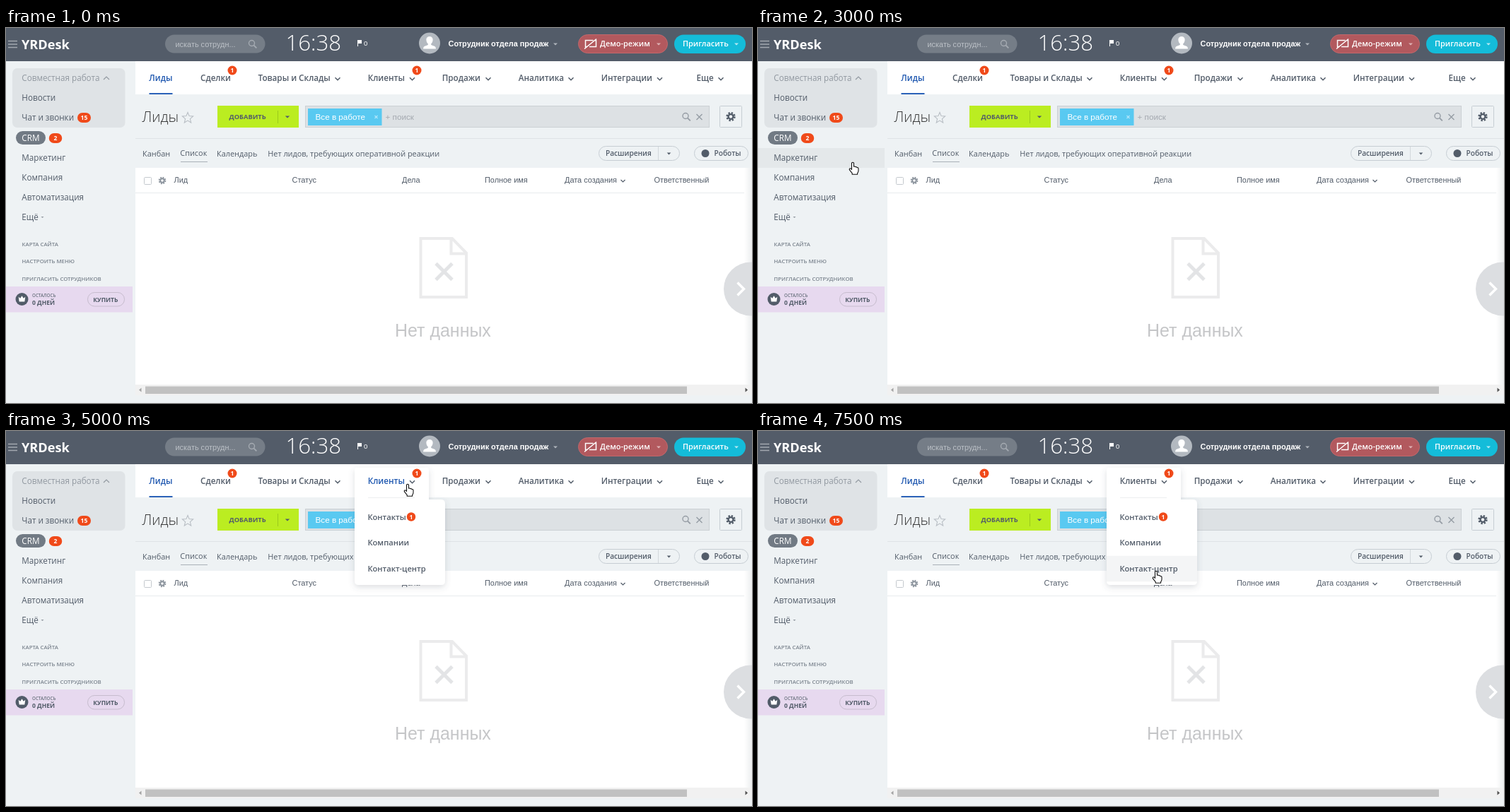
An HTML page for the animation above (8 s loop, 1055x531 px).

```html
<!DOCTYPE html>
<html lang="ru">
<head>
<meta charset="utf-8">
<title>CRM</title>
<style>
html, body { margin: 0; width: 100%; height: 100%; overflow: hidden; background: #eef2f4; }
svg { display: block; width: 100%; height: 100%; }
text { white-space: pre; }
.o { font-family: "Open Sans", sans-serif; }
.a { font-family: "Liberation Sans", Arial, sans-serif; }
</style>
</head>
<body>
<svg id="stage" viewBox="0 0 1055 531"></svg>
<script>
const INK = '#525c69', RED = '#f04a1a', GREY = '#a4a9b0';

const rect = (x, y, w, h, fill, r = 0, extra = '') =>
  `<rect x="${x}" y="${y}" width="${w}" height="${h}" rx="${r}" fill="${fill}" ${extra}/>`;
const circle = (x, y, r, fill, extra = '') =>
  `<circle cx="${x}" cy="${y}" r="${r}" fill="${fill}" ${extra}/>`;
const line = (d, stroke, w = 1, extra = '') =>
  `<path d="${d}" fill="none" stroke="${stroke}" stroke-width="${w}" ${extra}/>`;
const shape = (d, fill, extra = '') => `<path d="${d}" fill="${fill}" ${extra}/>`;
const label = (cls, x, y, str, size, fill = INK, weight = 400, extra = '') =>
  `<text class="${cls}" x="${x}" y="${y}" font-size="${size}" fill="${fill}" font-weight="${weight}" ${extra}>${str}</text>`;
const open = (...args) => label('o', ...args);
const arial = (...args) => label('a', ...args);
const chevron = (x, y, color = INK, r = 3.5, w = 1.5) =>
  line(`M${x - r} ${y - r / 2}l${r} ${r} ${r} ${-r}`, color, w);
const caret = (x, y, color, r = 3) => shape(`M${x - r} ${y - r / 2}h${2 * r}l${-r} ${r}z`, color);
const badge = (x, y, w, h, str, size) => rect(x - w / 2, y - h / 2, w, h, RED, h / 2) +
  open(x, y + size * .36, str, size, '#fff', 700, 'text-anchor="middle"');
const cross = (x, y, r, color, w) =>
  line(`M${x - r} ${y - r}l${2 * r} ${2 * r}m0 ${-2 * r}l${-2 * r} ${2 * r}`, color, w);
const lens = (x, y, r, color) => circle(x, y, r, 'none', `stroke="${color}" stroke-width="1.4"`) +
  line(`M${x + r * .7} ${y + r * .7}l4 4`, color, 1.8);
const gear = (x, y, r, fill, hole) => circle(x, y, r * .7, fill) +
  circle(x, y, r * .82, 'none', `stroke="${fill}" stroke-width="${r * .4}" stroke-dasharray="${r * .36} ${r * .284}"`) +
  circle(x, y, r * .34, hole);

function star(cx, cy, R) {
  const pts = Array.from({ length: 10 }, (_, i) => {
    const a = Math.PI * (i / 5 - .5), r = i % 2 ? R * .45 : R;
    return `${cx + r * Math.cos(a)} ${cy + r * Math.sin(a)}`;
  });
  return line(`M${pts.join('L')}z`, '#b8bec4', 1.1);
}

const header = () => rect(0, 0, 1055, 47, '#535c69') +
  line('M3 18.5h13M3 23h13M3 27.5h13', '#a2a8b0', 1.3) +
  open(22, 29.5, 'YRDesk', 18.2, '#fff', 700) +
  rect(225, 9.5, 141.5, 26, '#757d87', 13) +
  arial(239.5, 26.5, 'искать сотрудн...', 10.92, '#bcc1c7') +
  lens(347.5, 21.5, 4, '#a5abb2') +
  open(395.5, 32, '16:38', 31.2, '#fff', 300) +
  line('M497.5 17v9', '#fff') + rect(498, 17, 5, 5, '#fff') +
  arial(506, 24.5, '0', 9.6, '#fff') +
  circle(599, 21.5, 15, '#b3b9c0') +
  shape('M599 12c3 0 4.8 2.2 4.6 5.2-.2 2.6-1.4 4.3-2.4 5.1v1.6l5.3 2.2q1.3.7 1.5 3.4h-18q.2-2.7 1.5-3.4l5.3-2.2v-1.6c-1-.8-2.2-2.5-2.4-5.1-.2-3 1.6-5.2 4.6-5.2z', '#fff') +
  arial(625.5, 26, 'Сотрудник отдела продаж', 10.92, '#fff', 700) +
  caret(777, 23, '#b0b6bd') +
  rect(809.5, 9.5, 126, 26, '#b2595e', 13, 'stroke="#c4686c"') +
  line('M822 26.5h-2.5v-9h11M832.5 17.5h2v9h-9.5M818 29.5l17-14', '#fff', 1.5) +
  open(840, 26.3, 'Демо-режим', 10.92, '#fff', 600) + caret(923, 23, '#dfb3b5') +
  rect(945, 9.5, 101, 26.5, '#14bcd9', 13.2) +
  open(957, 26.3, 'Пригласить', 10.92, '#fff', 600) + caret(1033, 23, '#b5eaf3');

const sidebarBack = () => rect(9, 57, 159.5, 84, '#dfe3e6', 7) + rect(0, 366, 179, 36.5, '#e7d9ef');

const sidebar = () => {
  const items = ['Новости', 'Чат и звонки', '', 'Маркетинг', 'Компания', 'Автоматизация', 'Ещё'];
  const links = ['КАРТА САЙТА', 'НАСТРОИТЬ МЕНЮ', 'ПРИГЛАСИТЬ СОТРУДНИКОВ'];
  return open(22.3, 75, 'Совместная работа', 11.7, '#9299a1') +
    line('M138 73l4-4 4 4', '#9299a1', 1.2) +
    items.map((s, i) => open(22.3, 103.2 + i * 28.1, s, 11.7)).join('') +
    badge(110.5, 127, 19, 14, '15', 8.6) +
    rect(14, 146, 42, 19, '#717a84', 9.5) +
    open(22.3, 160, 'CRM', 11.7, '#fff', 500) +
    badge(70, 156, 18.5, 14, '2', 8.6) + caret(51.5, 268, '#9299a1', 2) +
    links.map((s, i) => open(22.5, 309.3 + i * 24.1, s, 7.8, '#7c858f', 600)).join('') +
    circle(22.5, 384, 9, INK) +
    shape('M17.7 380.7l2.5 2 2.3-3.4 2.3 3.4 2.5-2-1 6.8h-7.6z', '#fff') +
    open(37, 380.5, 'ОСТАЛОСЬ', 6.24, '#6c7480', 600) +
    open(37, 392, '0 ДНЕЙ', 8.58, INK, 700) +
    rect(115.5, 374.5, 52, 19.5, 'none', 9.7, 'stroke="#c6bccd"') +
    open(123.3, 387.5, 'КУПИТЬ', 8.58, INK, 700);
};

const tabs = () => rect(183, 47, 872, 47, '#fff') +
  open(202.3, 75, 'Лиды', 11.7, '#1f58b0', 600) + rect(202.5, 92, 33, 2, '#2b62b8') +
  [[275, 'Сделки'], [356.6, 'Товары и Склады', 469], [616.7, 'Продажи', 682], [724.7, 'Аналитика', 799],
   [841.7, 'Интеграции', 924.5], [976.4, 'Еще', 1011]]
    .map(([x, s, c]) => open(x, 75, s, 11.7, INK, 600) + (c ? chevron(c, 72) : '')).join('') +
  badge(320, 60, 13, 13, '1', 8.6);

const toolbar = () => open(192.5, 133, 'Лиды', 20.3, '#333', 300) + star(257, 127.5, 8) +
  rect(299, 110, 115, 31, '#bbed21') + open(315.5, 129.3, 'ДОБАВИТЬ', 9.36, INK, 700) +
  line('M384.5 117v18', '#9cc91c') + caret(398, 126, INK, 3.2) +
  rect(423.5, 110.5, 571, 30, '#dde1e4', 0, 'stroke="#cbd0d4"') +
  rect(427, 114, 104.5, 24, '#59c9f1') + arial(437.5, 129.7, 'Все в работе', 11.7, '#fff') +
  cross(523.5, 126, 2, '#b4e7fa', 1.1) + arial(536.5, 129.7, '+ поиск', 11.7, GREY) +
  lens(961, 124.5, 4, '#959ca4') + cross(980.5, 126, 4, '#959ca4', 1.4) +
  rect(1009.5, 110.5, 31, 30, '#eef2f4', 1, 'stroke="#c6cdd3"') + gear(1025, 125.5, 6.5, INK, '#eef2f4') +
  line('M183 156.5H1055', '#dfe3e6') +
  [[193, 'Канбан'], [246.3, 'Список'], [370.3, 'Нет лидов, требующих оперативной реакции']]
    .map(([x, s]) => open(x, s === 'Список' ? 181.3 : 182, s, 10.92)).join('') +
  open(298, 182, 'Календарь', 10.92) +
  line('M247 189.5H285', '#a9b0b7') +
  rect(838.5, 167.5, 114, 20, 'none', 10, 'stroke="#c6cdd3"') +
  open(848, 181, 'Расширения', 10.14, INK, 600) + line('M922.5 168v19', '#d3d8dc') + caret(937.5, 178, INK, 2.8) +
  rect(973.5, 167.5, 76, 20, 'none', 10, 'stroke="#c6cdd3"') +
  circle(989, 177.5, 5.5, INK) + open(1001.5, 181, 'Роботы', 10.14, INK, 600);

const table = () => rect(183, 198, 872, 307, '#fff') + line('M183 233.5H1055', '#e8ebed') +
  rect(195.5, 211.5, 10, 10, '#fff', 1, 'stroke="#c4c9ce"') + gear(221, 216, 5.2, '#8d959e', '#fff') +
  [[404.5, 'Статус'], [560, 'Дела'], [677, 'Полное имя'], [790, 'Дата создания'],
   [916.5, 'Ответственный'], [1047, 'Последнее']].map(([x, s]) => arial(x, 219.3, s, 10.92)).join('') +
  chevron(872.5, 216.5, INK, 3, 1.2) +
  line('M586.5 298H631L651 318.5V381H586.5zM629.5 298V319.5H651', '#ebebec', 4) +
  cross(619.5, 345, 11.5, '#e3e4e6', 5) +
  arial(550, 436.5, 'Нет данных', 24.96, '#c5c6c8') +
  rect(1044, 198, 11, 307, 'url(#edge)') +
  circle(1053, 369.5, 38, '#dcdee1') + line('M1034.5 360.5l9 9-9 9', '#fff', 3.4) +
  rect(183, 505, 872, 15, '#f1f1f1') + rect(197, 507.5, 766, 10.5, '#c1c1c1') +
  shape('M188 512.5l3.5-3v6z', '#a3a3a3') + shape('M1049 512.5l-3.5-3v6z', '#505050');

const menuRows = [[121.5, 'Контакты'], [158.2, 'Компании'], [195, 'Контакт-центр']];
const menu = () => `<g filter="url(#shadow)">` +
  shape('M493 56q0-4 4-4h97q4 0 4 4v41h17q6 0 6 6v109q0 6-6 6H499q-6 0-6-6z', '#fff') + '</g>' +
  rect(493, 0, 128, 36.5, '#f4f5f6', 0, 'id="menuHover"') +
  line('M512 94.5H578', '#eceef0') +
  menuRows.map(([y, s]) => open(511.4, y + 4, s, 11.15, INK, 600)).join('') +
  badge(573, 121.5, 12.5, 12.5, '1', 8.6);

const hand = 'M-1.5 1.2Q0-.6 1.5 1.2V6.3Q3 5.6 4 6.8 5.4 6.2 6 7.6 7.6 7.2 8 8.8V12Q8 14 6.6 15.6V17.3H-.8V15.6L-4.4 11.2Q-5.4 9.2-3.7 8.8-2.6 8.8-1.5 10.4z';
const arrow = 'M.5.5V15.5L4 12.3 6.3 17.8 8.8 16.8 6.5 11.4H11.4z';

const stage = document.getElementById('stage');
stage.innerHTML = `<defs>
  <filter id="shadow" x="-20%" y="-20%" width="140%" height="140%"><feDropShadow dx="0" dy="3" stdDeviation="4" flood-color="#525c69" flood-opacity=".2"/></filter>
  <linearGradient id="edge"><stop offset="0" stop-color="#fff"/><stop offset="1" stop-color="#eceeef"/></linearGradient>
  </defs>` + rect(0, 0, 1055, 531, '#eef2f4') + sidebarBack() +
  rect(0, 0, 179, 28, '#e4e8ea', 0, 'id="rowHover"') +
  header() + sidebar() + tabs() + toolbar() + table() +
  arial(237.5, 219.3, 'Лид', 10.92, INK, 400, 'id="lead"') +
  `<g id="menu">${menu()}</g>` +
  open(511.7, 75, 'Клиенты', 11.7, INK, 600, 'id="clients"') + chevron(574.5, 72) +
  badge(581, 60, 13, 13, '1', 8.6) +
  `<path id="cursor" fill="#fff" stroke="#111" stroke-width="1.1" stroke-linejoin="round"/>`;

const el = id => document.getElementById(id);
const show = (node, on) => node.setAttribute('visibility', on ? 'visible' : 'hidden');

// Pointer stops: time, x, y. The picture steps four times a second.
const LOOP = 8000, STEP = 250;
const path = [
  [500, 362, 436], [750, 255, 350], [1000, 155, 280], [1250, 95, 225], [1500, 73, 200],
  [1750, 64, 138], [2500, 70, 155], [2750, 98, 180], [3000, 134, 190], [3250, 235, 196],
  [3500, 349, 199], [3750, 430, 185], [4000, 500, 155], [4250, 553, 118], [4500, 575, 98],
  [4750, 573, 87], [5000, 568, 75], [5750, 567, 86], [6000, 566, 112], [6250, 565, 142],
  [6500, 563, 170], [6750, 563, 188], [7000, 563, 192], [7250, 563, 196], [7500, 563, 198]
];

function draw(ms) {
  const t = Math.floor(ms % LOOP / STEP) * STEP;
  const stop = path.findLast(p => p[0] <= t);
  const [, x, y] = stop || [0, -99, -99];
  const opened = t >= 5000;

  const onRow = x > 0 && x < 179 && y >= 170 && y < 254;
  show(el('rowHover'), onRow);
  if (onRow) el('rowHover').setAttribute('y', 170 + Math.floor((y - 170) / 28) * 28);

  const onLead = x > 230 && x < 395 && y >= 198 && y < 233;
  el('lead').setAttribute('fill', onLead ? '#20262e' : INK);

  const onClients = x > 493 && x < 598 && y > 50 && y < 97;
  el('clients').setAttribute('fill', onClients ? '#1f58b0' : INK);

  const item = opened && y >= 103 ? menuRows.find(r => Math.abs(y - r[0]) <= 18.4) : null;
  el('menu').setAttribute('visibility', opened ? 'visible' : 'hidden');
  show(el('menuHover'), !!item);
  if (item) el('menuHover').setAttribute('y', item[0] - 18.2);

  const link = x < 179 || onLead || onClients || opened;
  const cursor = el('cursor');
  show(cursor, !!stop);
  cursor.setAttribute('d', link ? hand : arrow);
  cursor.setAttribute('transform', `translate(${x} ${y})`);
}

const start = performance.now();
(function tick() {
  draw(performance.now() - start);
  requestAnimationFrame(tick);
})();
</script>
</body>
</html>
```
